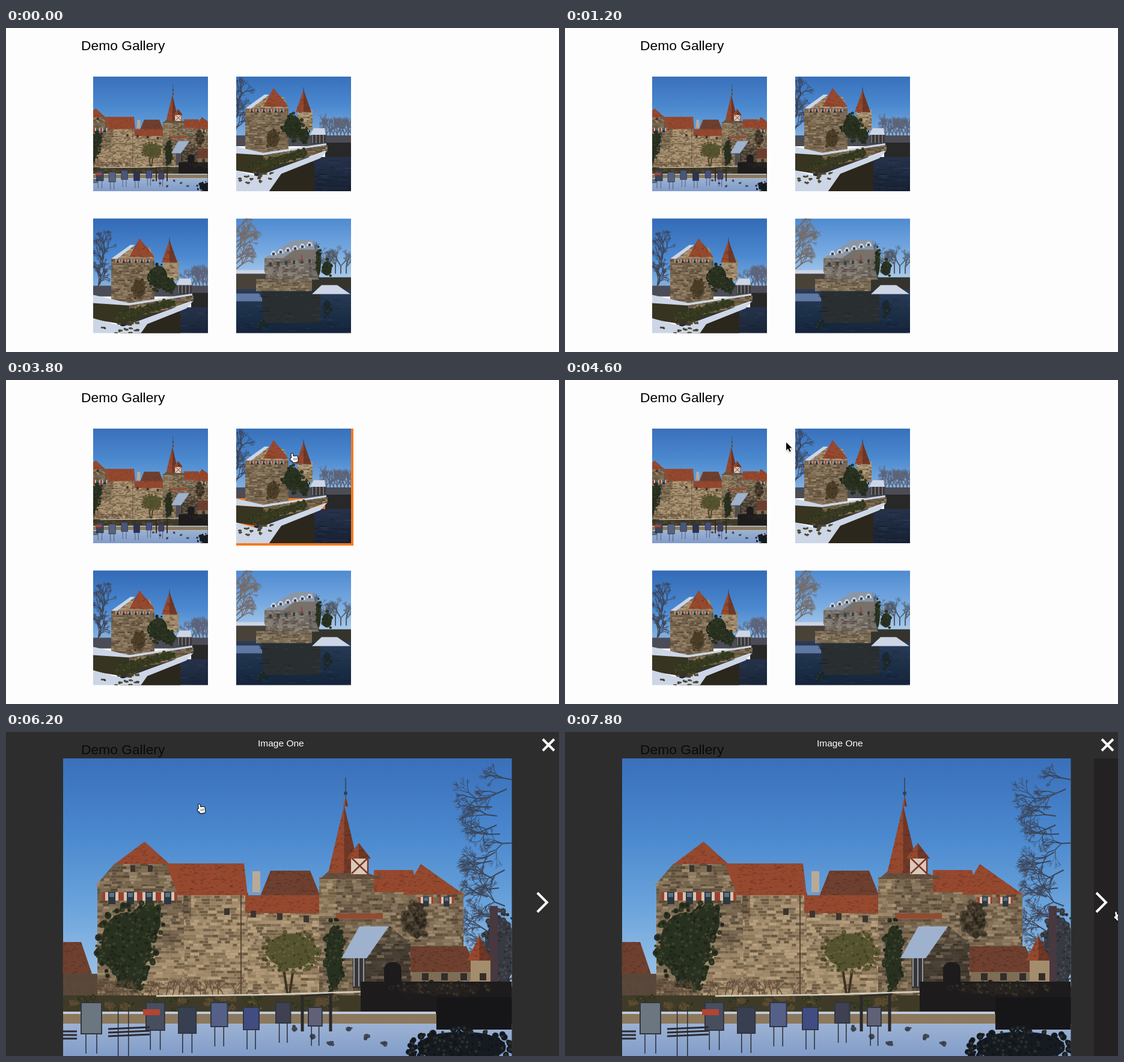
Write an HTML page with a canvas that moves like this. It is 920 px wide and 540 px high and loops after 8 s.

```html
<!DOCTYPE html>
<html lang="en">
<head>
<meta charset="utf-8">
<title>Demo Gallery</title>
<style>
html, body { margin: 0; width: 100%; height: 100%; overflow: hidden; background: #fdfdfd; }
canvas { display: block; }
</style>
</head>
<body>
<canvas id="stage" width="920" height="540"></canvas>
<script>
const W = 920, H = 540, LOOP = 8000, STEP = 200, OPEN = 6200, THUMB = 191;
const TILE = '#96492f', TILE_DARK = '#6f4030', SUNLIT = '#a48d6d', SHADED = '#7f6d55';
const SNOW = '#ccd6e6', IVY = '#283020', DARK = '#1d1b1c', BRANCH = '#3c4354';
const stage = document.getElementById('stage').getContext('2d');
let ctx;
let seed = 7;
const rnd = (a = 0, b = 1) => {
  seed = (seed * 1664525 + 1013904223) % 4294967296;
  return a + (b - a) * seed / 4294967296;
};
const times = (n, f) => { for (let i = 0; i < n; i++) f(i); };

// Basic shapes
const shape = pts => new Path2D(`M${pts}Z`);
// Trapezoid whose top edge is inset by l and r
const trap = (x, y, w, h, l = 0, r = l) =>
  shape([x, y + h, x + l, y, x + w - r, y, x + w, y + h].join(' '));

function fill(color, path) {
  ctx.fillStyle = color;
  ctx.fill(path);
}
function rect(color, x, y, w, h) {
  ctx.fillStyle = color;
  ctx.fillRect(x, y, w, h);
}
function dot(color, x, y, rx, ry = rx) {
  ctx.fillStyle = color;
  ctx.beginPath();
  ctx.ellipse(x, y, rx, ry, 0, 0, 2 * Math.PI);
  ctx.fill();
}
function line(color, width, ...pts) {
  ctx.strokeStyle = color;
  ctx.lineWidth = width;
  ctx.stroke(new Path2D('M' + pts.join(' ')));
}
function fade(x, y, w, h, ...colors) {
  const g = ctx.createLinearGradient(0, y, 0, y + h);
  colors.forEach((c, i) => g.addColorStop(i / (colors.length - 1), c));
  rect(g, x, y, w, h);
}
function clipped(path, paint) {
  ctx.save();
  ctx.clip(path);
  paint();
  ctx.restore();
}

// Scenery
function stone(color, x, y, w, h, l, r, row = 5) {
  const path = trap(x, y, w, h, l, r);
  fill(color, path);
  clipped(path, () => {
    for (let v = y; v < y + h; v += row)
      for (let u = x - rnd(0, row), len; u < x + w; u += len) {
        len = row * rnd(1, 3);
        const tone = rnd(-.5, .3);
        rect(tone < 0 ? `rgba(40,30,20,${-tone})` : `rgba(240,215,175,${tone})`, u, v, len - .7, row - .8);
      }
  });
}
function roof(x, y, w, h, l, r, color = TILE) {
  const path = trap(x, y, w, h, l, r);
  fill(color, path);
  clipped(path, () => times(w * h / 25, () =>
    rect(`rgba(30,15,10,${rnd(0, .25)})`, rnd(x, x + w), rnd(y, y + h), 4, 1.5)));
}
function cone(x, y, w, h) {
  roof(x, y, w, h, w / 2);
  fill('rgba(40,25,25,.35)', trap(x + w / 2, y, w / 2, h, 0, w / 2));
}
function foliage(color, cx, cy, rx, ry, r = 4) {
  dot(color, cx, cy, rx * .8, ry * .8);
  times(rx * ry / r * .35, i => {
    const a = rnd(0, 2 * Math.PI), d = Math.sqrt(rnd());
    const x = cx + Math.cos(a) * rx * d, y = cy + Math.sin(a) * ry * d;
    dot(color, x, y, rnd(.3, 1) * r);
    dot(i % 2 ? 'rgba(0,0,0,.25)' : 'rgba(160,160,90,.16)', x, y, r * .4);
  });
}
function branch(color, x, y, a, len, depth) {
  const x2 = x + Math.cos(a) * len, y2 = y + Math.sin(a) * len;
  line(color, Math.max(.5, depth * .5), x, y, x2, y2);
  if (depth > 0)
    times(3, () => branch(color, x2, y2, a + rnd(-.8, .8), len * rnd(.6, .9), depth - 1));
}
function shutters(x, y, n, gap, s = 1) {
  times(n, i => {
    const u = x + i * gap;
    rect('#d5c3b0', u - 10 * s, y, 32 * s, 14 * s);
    for (const side of [-10, 17]) rect('#9c4030', u + side * s, y, 5 * s, 14 * s);
    rect('#2c3842', u, y - s, 12 * s, 21 * s);
    rect('#5f7080', u + 2 * s, y + s, 8 * s, 7 * s);
  });
}
function ripples(x, y, w, h) {
  times(60, i => rect(i % 2 ? 'rgba(90,115,150,.2)' : 'rgba(5,10,18,.25)',
    x + rnd(0, w), y + rnd(0, h), rnd(4, 18), 1));
}

// Castle above a snowy garden, seen in stage coordinates
function castle() {
  fade(95, 44, 747, 380, '#3a70ba', '#4a88ce', '#6da5dc', '#9fc5e8');
  times(24, i => branch(BRANCH, rnd(800, 845), 80 + i * 15, Math.PI + rnd(-.6, .6), 18, 4));
  foliage('#373a43', 822, 365, 32, 70, 5);
  rect('#483840', 805, 290, 13, 130);
  roof(75, 350, 68, 53, 0, 18, TILE_DARK);
  rect('#57473a', 95, 403, 57, 50);

  stone(SHADED, 152, 256, 146, 190);
  stone(SHADED, 148, 219, 150, 38, 33, 25);
  stone(SUNLIT, 296, 268, 107, 178);
  stone(SUNLIT, 402, 300, 128, 146);
  stone(SUNLIT, 225, 360, 72, 86);
  rect('rgba(40,30,22,.35)', 295, 268, 13, 40);
  roof(181, 183, 91, 37, 49, 41);
  roof(286, 219, 116, 53, -20, 6);
  roof(422, 231, 102, 45, 18, 18, TILE_DARK);
  roof(398, 272, 132, 30, 0, 3);
  rect('#b8aa98', 410, 232, 13, 35);
  line('#443426', 1.5, 391, 272, 391, 438);

  stone(SHADED, 627, 266, 134, 150);
  stone(SHADED, 521, 242, 106, 200);
  rect('rgba(220,190,140,.2)', 521, 246, 28, 64);
  rect(TILE, 550, 303, 77, 8);
  roof(612, 230, 75, 37, 0, 10);
  roof(660, 220, 102, 51, 30, 72);
  roof(522, 232, 108, 13, 15, 38, '#66503f');
  cone(536, 122, 53, 113);
  line('#33435a', 1.5, 565, 76, 565, 108);
  dot('#33404a', 565, 102, 3);
  cone(561, 107, 8, 17);
  rect('#d8cabb', 574, 209, 29, 28);
  line('#7c3528', 2.5, 575, 210, 602, 236, 602, 210, 575, 236);
  cone(567, 185, 40, 26);
  shutters(170, 267, 4, 31);
  shutters(321, 280, 1);
  shutters(694, 275, 2, 34, .8);
  times(4, i => rect('#39342f', 363 + i * 44, 294 + i * 4, 9, 11));
  times(2, i => rect('#39342f', 207 + i * 29, 222, 8, 11));

  foliage('rgba(43,36,28,.5)', 682, 315, 22, 35, 6);
  foliage(IVY, 200, 354, 52, 66, 6);
  foliage(IVY, 238, 315, 24, 36, 6);
  foliage(IVY, 207, 410, 26, 23, 6);
  foliage(IVY, 546, 375, 17, 66, 5);
  times(2, i => line('#3b3322', 4, 462 + i * 16, 395, 468 + i * 4, 436));
  foliage('#55532f', 474, 365, 50, 36, 5);

  stone('#4c4338', 598, 352, 75, 94);
  stone('#5d5142', 598, 323, 75, 30, 40, 35);
  rect(DARK, 629, 395, 29, 50);
  dot(DARK, 643.5, 395, 14.5, 12);
  rect('#35363a', 577, 371, 21, 56);
  times(3, i => line('#b9b8b5', 1.5, 579 + i * 8, 374, 579 + i * 8, 424));
  fill('#9fb2cd', trap(558, 324, 42, 53, 30, -37));
  roof(673, 357, 113, 43, 0, 20, TILE_DARK);
  rect('#7f6d56', 675, 400, 105, 15);
  rect(SUNLIT, 773, 380, 33, 37);
  cone(767, 339, 41, 42);
  times(4, i => rect('#332d2a', 692 + i * 32, 402, 11, 12));

  times(28, i => branch('#604a3a', 105 + i * 10, 444, -Math.PI / 2 + rnd(-.6, .6), 11, 3));
  rect('#3f3a28', 95, 439, 500, 30);
  times(45, i => foliage(i % 2 ? '#373821' : '#57482f', rnd(95, 560), rnd(442, 464), 9, 6, 3));
  line('#d6d0c2', 2.5, 250, 440, 420, 438, 590, 433);
  rect(DARK, 590, 416, 251, 55);
  foliage('#26221f', 720, 428, 85, 12, 5);
  rect('#8b785d', 95, 469, 650, 17);
  rect('#bdc9da', 95, 466, 620, 4);
  fade(95, 486, 747, 57, '#9db2d3', '#7f9bc8');
  rect('#161619', 716, 442, 126, 54);
  foliage('#161b22', 758, 525, 92, 32, 6);
  times(6, i => foliage('#3f4654', 480 + i * 30, 495 + i % 3 * 12, 6, 5, 3));

  // Display boards and benches
  times(8, i => {
    const x = 124 + i * 54, w = 36 - i * 1.6, y = 450 + (i % 2) * 8, h = 54 - i * 3;
    for (const side of [.25, .75]) line('#292c35', 1.5, x + w * side, y, x + w * side, y + h + 32);
    if (i !== 1) {
      rect('#303642', x, y, w, h);
      rect(`hsl(${210 + i * 4} ${rnd(8, 35)}% ${rnd(24, 52)}%)`, x + 2, y + 2, w - 4, h - 4);
    }
  });
  rect('#b44434', 228, 462, 28, 10);
  times(3, i => line('#2c2b31', 3, 170, 495 + i * 6, 239, 492 + i * 6));
  times(3, i => line('#2c2b31', 3, 95, 499 + i * 6, 118, 499 + i * 6));
  times(2, i => line('#2b292b', 5, 493 + i * 47, 438, 493 + i * 47, 499));
  line('#302a29', 3, 489, 440, 545, 437);
}

// Gabled building on a moat; extends past the left and top edges
function moat() {
  fade(-16, -16, 210, 130, '#3269b5', '#4b89d0', '#94bce5');
  times(6, i => branch(BRANCH, i * 2 - 6, 110 - i * 14, -1.5 + rnd(-.4, .4), 12, 4));
  times(8, i => branch('#5d6377', 150 + i * 6, 108, -Math.PI / 2, 13, 4));
  rect('#4b4c55', -16, 98, 210, 18);

  stone(SHADED, 15, 52, 72, 75, 0, 0, 3);
  stone(SUNLIT, 15, 34, 72, 19, 30, 8, 3);
  fill(SNOW, trap(15, 30, 10, 23, 32, -30));
  roof(45, 19, 42, 31, 17, 25);
  shutters(24, 54, 6, 10, .3);
  stone(SUNLIT, 102, 55, 25, 34, 0, 0, 3);
  cone(99, 22, 26, 37);
  line(BRANCH, 1, 112, 18, 112, 26);
  foliage(IVY, 94, 84, 18, 24, 3);
  foliage(IVY, 112, 98, 12, 14, 3);
  foliage('#4a3d28', 61, 103, 13, 18, 3);
  rect('#38383c', 125, 95, 24, 17);
  times(4, i => line('#a9a7a3', 1, 127 + i * 6, 97, 127 + i * 6, 111));
  fill(SNOW, trap(123, 86, 26, 11, 6, 2));
  rect('#292829', 148, 110, 47, 28);

  fade(30, 134, 165, 70, '#25324a', '#141d2e');
  ripples(90, 140, 100, 52);
  fill('#2c271c', trap(40, 142, 90, 60, 50, 0));
  fill(SNOW, shape('-16 113 45 127 150 111 150 116 30 138 -16 128'));
  fill('#383422', shape('-16 127 45 131 152 114 152 122 40 163 -16 154'));
  clipped(shape('45 131 152 114 152 122 100 141 45 150'), () => stone('#74644b', 40, 112, 114, 40, 0, 0, 3));
  times(10, i => foliage('#353a20', 30 + i * 9, 150 - i * 2.5, 9, 8, 3));
  fill(SNOW, shape('-16 152 35 166 152 123 140 136 75 162 45 205 -16 205'));
  times(14, () => foliage('#4f4932', rnd(0, 60), rnd(158, 178), 4, 2, 2));
}

// Building mirrored in a lake
function lake() {
  fade(0, 0, 192, 112, '#4f8ad1', '#78aae1', '#b8d3ec');
  times(8, i => branch('#756a66', 0, 84 - i * 9, -.8 + rnd(-.5, .4), 12, 4));
  times(6, i => branch('#505966', 138 + i * 9, 92, -Math.PI / 2, 15 - i % 3 * 2, 4));
  rect('#34342d', 122, 98, 70, 24);
  stone('#77716a', 47, 66, 91, 36, 0, 0, 3);
  stone('#77716a', 47, 50, 91, 18, 26, 5, 3);
  fill('#8c97a5', trap(47, 36, 87, 30, 48, 6));
  fill('#77716a', trap(76, 52, 60, 15, 22, 3));
  times(6, i => {
    fill(SNOW, trap(56 + i * 12, 54 - i * 3, 12, 7, 4));
    rect('#343d49', 60 + i * 12, 57 - i * 3, 4, 4);
    rect('#373f47', 55 + i * 13, 73 - i, 4, 6);
  });
  rect('#9d4439', 108, 61, 2, 11);
  foliage(IVY, 137, 73, 5, 27, 3);
  foliage(IVY, 151, 83, 10, 15, 3);
  rect('#484239', 0, 91, 49, 28);
  fill(SNOW, trap(0, 86, 49, 6, 0, 4));

  fade(0, 118, 192, 74, '#2a3b58', '#1d3149', '#14243a');
  fill('#6079a3', trap(0, 125, 46, 13, 0, 8));
  fill('#292e31', trap(46, 119, 94, 55, -4, 0));
  ripples(0, 126, 190, 64);
  stone('#81725b', 33, 101, 93, 20, 0, 0, 3);
  fill(SNOW, trap(126, 111, 64, 15, 16, 22));
  foliage('#18292e', 43, 177, 9, 8, 3);
  foliage('#1d2930', 151, 149, 9, 17, 3);
}

// Layers
function photo(x, y, w, h, paint, ox = 0, oy = 0, scale = 1) {
  const frame = new Path2D();
  frame.rect(x, y, w, h);
  clipped(frame, () => {
    ctx.translate(x, y);
    ctx.scale(scale, scale);
    ctx.translate(ox, oy);
    paint();
  });
}
function label(text, x, y, size, color) {
  ctx.font = `${size}px "Liberation Sans", Arial, sans-serif`;
  ctx.fillStyle = color;
  ctx.fillText(text, x, y);
}
function layer(paint) {
  const c = document.createElement('canvas');
  c.width = W;
  c.height = H;
  ctx = c.getContext('2d');
  paint();
  return c;
}
const title = color => label('Demo Gallery', 125, 37, 22.8, color);
const scenes = [[castle, -219, -44, THUMB / 498], [moat], [moat, 15, 14], [lake]];
const thumbs = scenes.map((_, i) => [145 + i % 2 * 238, 81 + (i >> 1) * 236.5]);

const gallery = layer(() => {
  title('#000');
  thumbs.forEach(([x, y], i) => photo(x, y, THUMB, THUMB, ...scenes[i]));
});
const lightbox = layer(() => {
  rect('#2d2d2d', 0, 0, W, H);
  title('#0a0a0a');
  label('Image One', 419, 24, 15.5, '#fff');
  photo(94.5, 44, 747, 496, castle, -94.5, -44);
});

// Pointer moves: start time, end time, destination
const ENTER = 1800;
const moves = [[ENTER, 2400, 698, 161], [2800, 4400, 368, 104], [5000, 5600, 318, 120], [7000, 7800, 913, 299]];
const ease = p => p * p * (3 - 2 * p);

function pointerAt(t) {
  let x = 790, y = 190;
  for (const [from, to, x2, y2] of moves) {
    const e = ease(Math.min(1, Math.max(0, (t - from) / (to - from))));
    x += (x2 - x) * e;
    y += (y2 - y) * e;
  }
  return [x, y];
}
const arrow = shape('0 0 0 13.2 3 10.3 5.4 15.6 7.8 14.6 5.4 9.5 9.5 9.3');
const hand = new Path2D();
times(4, i => hand.roundRect(2 + i * 2.3, i ? 4.5 + i * .3 : 0, 2.6, 8, 1.3));
hand.roundRect(2, 7, 9.5, 8, 2.5);
hand.roundRect(-.5, 7, 4, 4.5, 2);

function pointer(x, y, isHand) {
  const path = isHand ? hand : arrow;
  ctx.save();
  ctx.translate(x, y + isHand);
  if (isHand) ctx.rotate(-.15);
  ctx.lineJoin = 'round';
  ctx.lineWidth = 2;
  ctx.strokeStyle = isHand ? '#111' : '#fff';
  ctx.shadowColor = 'rgba(0,0,0,.3)';
  ctx.shadowBlur = 2;
  ctx.shadowOffsetY = 1;
  ctx.stroke(path);
  ctx.shadowColor = 'transparent';
  fill(isHand ? '#fff' : '#000', path);
  if (isHand) times(3, i => line('#333', .7, 5 + i * 2.2, 8, 5 + i * 2.2, 12));
  ctx.restore();
}

function draw(t) {
  const [x, y] = pointerAt(t);
  ctx = stage;
  if (t >= OPEN) {
    ctx.drawImage(lightbox, 0, 0);
    if (t > OPEN) rect('#242122', 880, 44, 40, 496);
    line('#fff', 4, 893, 12, 912, 31);
    line('#fff', 4, 912, 12, 893, 31);
    line('#fff', 4, 884, 268, 900, 284, 884, 300);
    pointer(x, y, true);
    return;
  }
  rect('#fdfdfd', 0, 0, W, H);
  const shown = t >= ENTER;
  const hover = shown && thumbs.find(([u, v]) => x >= u && x < u + THUMB && y >= v && y < v + THUMB);
  if (hover) rect('#f47a24', ...hover, THUMB + 4, THUMB + 4);
  ctx.drawImage(gallery, 0, 0);
  if (shown) pointer(x, y, !!hover);
}

const start = performance.now();
function tick() {
  const t = (performance.now() - start) % LOOP;
  draw(Math.floor(t / STEP) * STEP);
  requestAnimationFrame(tick);
}
tick();
</script>
</body>
</html>
```
